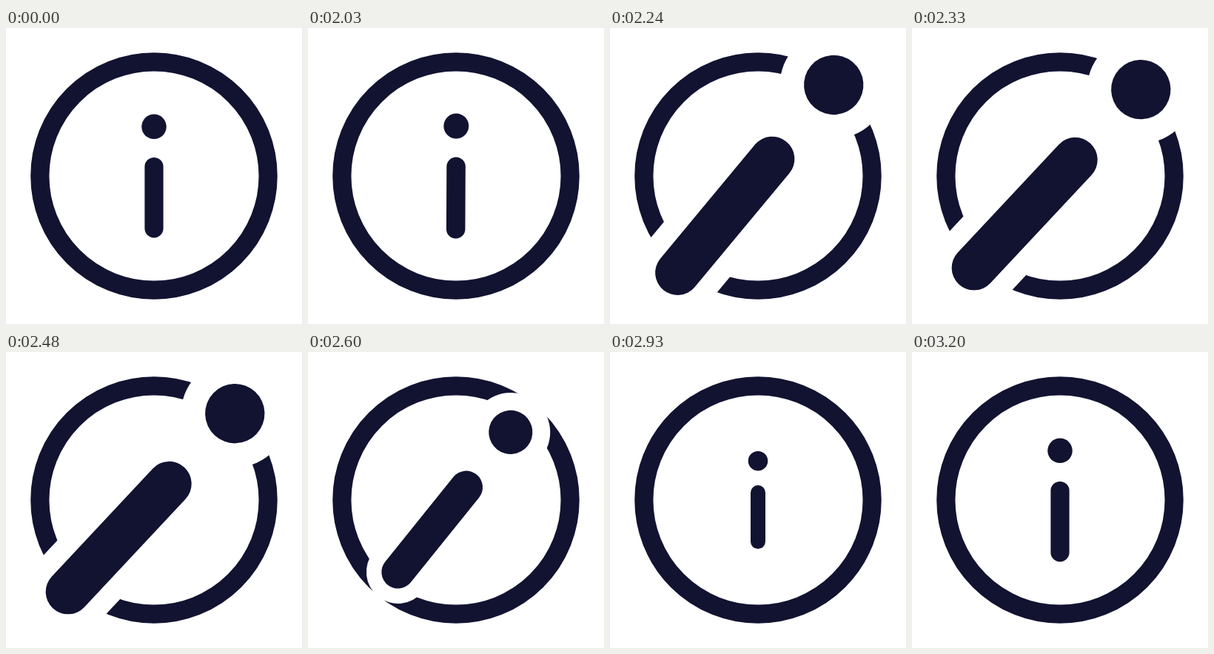
Animation of 400x400 px, one loop 3230 ms. Source, as an HTML page:

```html
<!DOCTYPE html>
<html lang="en">
<head>
<meta charset="utf-8">
<title>Info icon</title>
<style>
  html, body { margin: 0; height: 100%; overflow: hidden; background: #fff; }
  svg { display: block; width: 100%; height: 100%; }
  line { stroke-linecap: round; }
</style>
</head>
<body>
<svg viewBox="0 0 400 400">
  <circle cx="200" cy="200" r="154.17" fill="none" stroke="#121331" stroke-width="25.2"/>
  <g id="letter">
    <!-- white halo that cuts the ring -->
    <g fill="#fff" stroke="#fff">
      <circle cy="-66.67" r="30.3" stroke="none"/>
      <line y1="-12.5" y2="70.83" stroke-width="48.4"/>
    </g>
    <g fill="#121331" stroke="#121331">
      <circle cy="-66.67" r="16.75" stroke="none"/>
      <line y1="-12.5" y2="70.83" stroke-width="25.2"/>
    </g>
  </g>
</svg>
<script>
const LOOP = 3230, START = 2030, STEP = 30;
const letter = document.getElementById('letter');

// Keys are [time in ms, value], eased in and out between neighbours.
const scaleKeys = [[2018, 1], [2236, 2.4], [2478, 2.4], [2772, 0.7], [3200, 1]];
const angleKeys = [[2018, 0], [2286, 43.1], [2540, 43.1], [2849, 0]];

function valueAt(keys, t) {
  let value = keys[0][1];
  for (let i = 1; i < keys.length; i++) {
    const [t0, a] = keys[i - 1], [t1, b] = keys[i];
    const u = Math.min(1, Math.max(0, (t - t0) / (t1 - t0)));
    value += (b - a) * u * u * (3 - 2 * u);
  }
  return value;
}

function draw(now) {
  const t = now % LOOP;
  const time = t < START ? 0 : START + Math.floor((t - START) / STEP) * STEP;
  letter.setAttribute('transform',
    `translate(200 200) rotate(${valueAt(angleKeys, time)}) scale(${valueAt(scaleKeys, time)})`);
  requestAnimationFrame(() => draw(performance.now() - begin));
}

const begin = performance.now();
draw(0);
</script>
</body>
</html>
```
